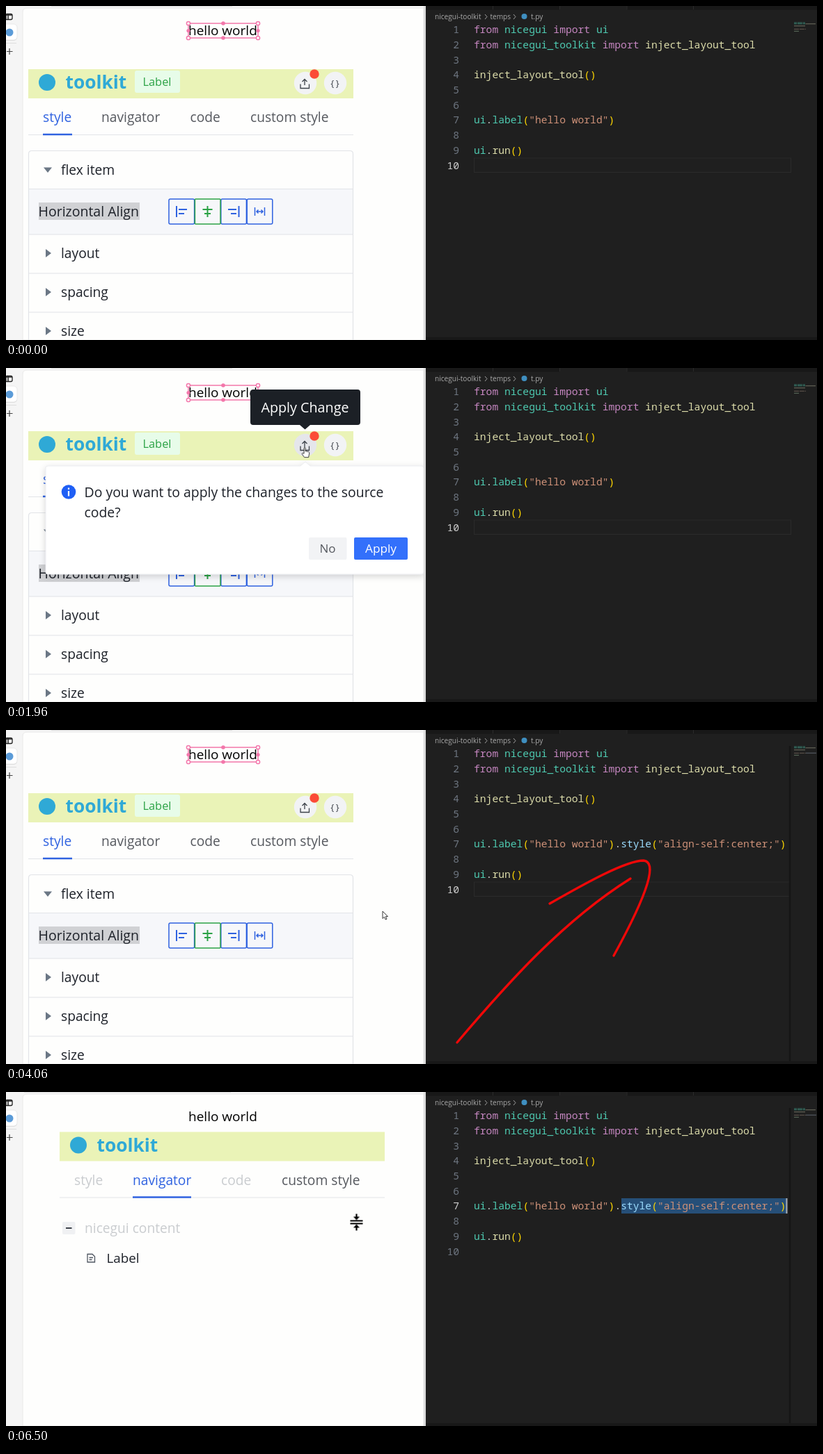
Recreate the animation shown at these times as an HTML page. Size 1165 by 481 pixels, loop 6.8 s.

```html
<!DOCTYPE html>
<html lang="en">
<head>
<meta charset="utf-8">
<title>Layout tool demo</title>
<style>
html, body { margin: 0; width: 100%; height: 100%; overflow: hidden; background: #f5f5f5; }
svg { display: block; width: 100%; height: 100%; }
text { font: 19.2px "Open Sans", "Noto Sans", sans-serif; white-space: pre; }
.code text { font: 14.667px "Noto Sans Mono", "DejaVu Sans Mono", monospace; fill: #d4d4d4; }
.code .num { fill: #6e7681; text-anchor: end; }
.crumb text { font-size: 10.1px; fill: #a9a9a9; }
.brand { font-size: 26.3px; font-weight: 700; fill: #2fa9d6; }
.k { fill: #c586c0; } .t { fill: #4ec9b0; } .f { fill: #dcdcaa; }
.s { fill: #ce9178; } .p { fill: #ffd700; }
.ink { fill: #1d2129; } .grey { fill: #55585e; } .off { fill: #c9cccf; } .blue { fill: #2f62e0; }
.line { fill: none; stroke: currentColor; }

/* one loop is 6.8 s; 1% = 68 ms */
.step { animation: 6.8s step-end infinite; }
.flow { animation: 6.8s linear infinite; }
.panel { animation-name: panel; }
.reload { animation-name: reload; }
.ready { animation-name: ready; }
.tree { animation-name: tree; }
.tip { animation-name: tip; }
.pop { animation-name: pop; transform-origin: 430px 136px; }
.up { animation-name: up; }
.tail { animation-name: tail; }
.fn { animation-name: fn; }
.row { animation-name: row; }
.n7 { animation-name: n7; }
.n10 { animation-name: n10; }
.sel { animation-name: sel; transform-origin: 884px 0; }
.caret { animation-name: caret; }
.caretShow { animation-name: caretShow; }
.slider { animation-name: slider; }
.ink1, .ink2 { stroke-dasharray: 100 200; }
.ink1 { animation-name: draw1; }
.ink2 { animation-name: draw2; }
.show1 { animation-name: show1; }
.show2 { animation-name: show2; }
.mouse { animation-name: mouse; animation-timing-function: ease-in-out; }
.arrow { animation-name: arrow; }
.hand { animation-name: hand; }
.beam { animation-name: beam; }
.size { animation-name: size; }

@keyframes panel { 0% { visibility: visible } 83.3%, 100% { visibility: hidden } }
@keyframes reload { 0% { visibility: hidden } 83.3% { visibility: visible } 89%, 100% { visibility: hidden } }
@keyframes ready { 0% { visibility: hidden } 89%, 100% { visibility: visible } }
@keyframes tree { 0%, 92.6% { opacity: 0 } 94.8%, 100% { opacity: 1 } }
@keyframes tip { 0%, 16.9% { opacity: 0 } 18.4%, 50.7% { opacity: 1 } 52.2%, 100% { opacity: 0 } }
@keyframes pop {
  0%, 25.7% { opacity: 0; transform: scale(.8) }
  28.7%, 45.6% { opacity: 1; transform: none }
  47.5%, 100% { opacity: 0; transform: scale(.8) }
}
@keyframes up { 0% { fill: #f2f3f5 } 16% { fill: #e5e6eb } 29.5%, 100% { fill: #f2f3f5 } }
@keyframes tail { 0% { visibility: hidden } 46.3%, 100% { visibility: visible } }
@keyframes fn { 0% { fill: #dcdcaa } 52.9%, 100% { fill: #9cdcfe } }
@keyframes row {
  0% { transform: none; visibility: visible }
  72.8% { transform: translateY(-65.4px); visibility: visible }
  75.7%, 100% { transform: translateY(-65.4px); visibility: hidden }
}
@keyframes n7 { 0% { fill: #6e7681 } 72.8%, 100% { fill: #ccc } }
@keyframes n10 { 0% { fill: #ccc } 72.8%, 100% { fill: #6e7681 } }
@keyframes sel { 0%, 75.7% { transform: scaleX(0); animation-timing-function: ease-in-out } 81.8%, 100% { transform: none } }
@keyframes caret { 0%, 75.7% { transform: none; animation-timing-function: ease-in-out } 81.8%, 100% { transform: translateX(237.5px) } }
@keyframes caretShow { 0% { visibility: hidden } 72.8%, 100% { visibility: visible } }
@keyframes slider { 0% { visibility: hidden } 82.4% { visibility: visible } 87.2%, 100% { visibility: hidden } }
@keyframes draw1 { 0%, 37.35% { stroke-dashoffset: 100 } 45%, 100% { stroke-dashoffset: 0 } }
@keyframes draw2 { 0%, 46% { stroke-dashoffset: 100 } 50.1%, 100% { stroke-dashoffset: 0 } }
@keyframes show1 { 0% { visibility: hidden } 37.4% { visibility: visible } 77.2%, 100% { visibility: hidden } }
@keyframes show2 { 0% { visibility: hidden } 46.1% { visibility: visible } 77.2%, 100% { visibility: hidden } }
@keyframes mouse {
  0%, 4.4% { transform: translate(338px, 352px) }
  10.3%, 11.2% { transform: translate(345px, 300px) }
  16.2%, 28.7% { transform: translate(429px, 114px) }
  34.6%, 45.6% { transform: translate(527.5px, 254px) }
  47%, 62.2% { transform: translate(541px, 261px) }
  71.3%, 75.7% { transform: translate(884px, 164px) }
  81.8% { transform: translate(1122px, 166px) }
  82.4%, 86.8% { transform: translate(1127px, 168px) }
  94.4%, 100% { transform: translate(503.5px, 187.5px) }
}
@keyframes arrow {
  0% { visibility: hidden } 4.4% { visibility: visible } 15.9% { visibility: hidden }
  46.3% { visibility: visible } 64.5% { visibility: hidden }
  82% { visibility: visible } 87.2% { visibility: hidden }
  93% { visibility: visible } 94.4%, 100% { visibility: hidden }
}
@keyframes hand { 0% { visibility: hidden } 15.9% { visibility: visible } 46.3%, 100% { visibility: hidden } }
@keyframes beam {
  0% { visibility: hidden } 64.5% { visibility: visible } 73% { visibility: hidden }
  75.7% { visibility: visible } 82% { visibility: hidden }
  87.2% { visibility: visible } 93%, 100% { visibility: hidden }
}
@keyframes size { 0% { visibility: hidden } 94.4%, 100% { visibility: visible } }
</style>
</head>
<body>
<svg viewBox="0 0 1165 481" preserveAspectRatio="none">
  <defs>
    <filter id="soft" x="-10%" y="-20%" width="120%" height="150%">
      <feDropShadow dx="0" dy="3" stdDeviation="5" flood-opacity=".16"/>
    </filter>
    <path id="closed" d="M57 -6L65 0L57 6Z" fill="#6b7785"/>
    <g id="head">
      <rect x="32" y="91" width="467" height="42" fill="#eaf3b7"/>
      <circle cx="59" cy="110" r="12" fill="#2fa9d6"/>
      <text class="brand" x="85.5" y="119">toolkit</text>
      <path class="line" color="#e3e5e8" d="M32 185.5H499"/>
    </g>
  </defs>

  <!-- browser frame -->
  <rect width="604" height="481" fill="#f5f5f5"/>
  <path d="M24 481V9Q24 3 30 3H600V481Z" fill="#fefefd" stroke="#e9e9e9"/>
  <path class="step panel" d="M65 0H325" stroke="#ccc"/>
  <path class="step reload" d="M65 0H206" stroke="#ccc"/>
  <path class="step ready" d="M26 0H323" stroke="#ccc"/>
  <path d="M1 11.5H7Q9 11.5 9 13.5V17.5Q9 19.5 7 19.5H1Q0 19.5 0 18.5V12.5Z" class="line" color="#222" stroke-width="1.3"/>
  <path d="M0 13H9M3 12V19" stroke="#222" stroke-width="1.5"/>
  <rect x="-10" y="27" width="26" height="23" rx="5" fill="#ddd"/>
  <rect x="-10" y="26" width="26" height="23" rx="5" fill="#fff" stroke="#dedede" stroke-width=".6"/>
  <g class="step panel"><circle cx="5" cy="38" r="5.5" fill="#5b9bd8"/></g>
  <g class="step ready"><circle cx="5" cy="38" r="5.5" fill="#5b9bd8"/></g>
  <path class="line step reload" color="#555" d="M1 34Q-2 38 1 41"/>
  <path d="M0 53.5H15" stroke="#ddd"/>
  <path d="M1 65.5H9.5M5 61V70" stroke="#444" stroke-width="1.2"/>

  <!-- style panel -->
  <g class="step panel">
    <text x="262" y="42" style="font-size:19px">hello world</text>
    <g fill="#fff" stroke="#f377ab" stroke-width="1.5">
      <rect x="262" y="25" width="100" height="21" fill="none"/>
      <circle cx="262" cy="25" r="2.6"/><circle cx="362" cy="25" r="2.6"/>
      <circle cx="262" cy="46" r="2.6"/><circle cx="362" cy="46" r="2.6"/>
    </g>
    <g fill="#f377ab">
      <circle cx="312" cy="25" r="2.8"/><circle cx="312" cy="46" r="2.8"/>
      <circle cx="262" cy="35.5" r="2.6"/><circle cx="362" cy="35.5" r="2.6"/>
    </g>

    <use href="#head"/>
    <rect x="185" y="93" width="65" height="32" rx="3" fill="#e7fce9"/>
    <text x="196.5" y="115" fill="#2ba245" style="font-size:16.4px">Label</text>
    <circle class="step up" cx="430" cy="111" r="16.2" fill="#f2f3f5"/>
    <path class="line" color="#3d424a" stroke-width="1.3" d="M429 114V106M425.5 109L429 105.5L432.5 109M423 112.5V118.5H435.5V112.5"/>
    <circle cx="443" cy="98" r="6.7" fill="#fb4b36"/>
    <circle cx="473" cy="111" r="16.2" fill="#f2f3f5"/>
    <text x="472.5" y="115.5" fill="#3d424a" text-anchor="middle" style="font:12.5px 'Noto Sans Mono',monospace">{}</text>

    <text class="blue" x="53" y="167">style</text>
    <text class="grey" x="137" y="167">navigator</text>
    <text class="grey" x="264.5" y="167">code</text>
    <text class="grey" x="351" y="167">custom style</text>
    <path d="M53 185H95" stroke="#2f62e0" stroke-width="2.6"/>

    <rect x="33" y="263" width="465" height="66" fill="#f6f7fa"/>
    <path class="line" color="#e2e4e8" stroke-width="1.2" d="M32.5 481V213Q32.5 208.5 37 208.5H494Q498.5 208.5 498.5 213V481M33 263.5H498M33 329H498M33 385H498M33 441H498"/>
    <path d="M54 232.5H66L60 240Z" fill="#6b7785"/>
    <use href="#closed" y="356"/><use href="#closed" y="412"/><use href="#closed" y="468"/>
    <g class="ink">
      <text x="79" y="243">flex item</text>
      <text x="79" y="363">layout</text>
      <text x="79" y="419">spacing</text>
      <text x="79" y="475">size</text>
    </g>
    <rect x="47" y="283" width="145" height="25" fill="#d0d1d4"/>
    <text class="ink" x="46.5" y="303" style="font-size:19.5px">Horizontal Align</text>

    <g class="line" color="#2f62e0" stroke-width="1.5">
      <rect x="234" y="278" width="36.6" height="36" rx="2"/>
      <rect x="308.8" y="278" width="36.6" height="36" rx="2"/>
      <rect x="346.2" y="278" width="36.6" height="36" rx="2"/>
      <rect x="271.4" y="278" width="36.6" height="36" rx="1" stroke="#2ba245"/>
      <path d="M357.5 290V302M371.5 290V302M360 296H369M362.5 293.5L360 296L362.5 298.5M366.5 293.5L369 296L366.5 298.5"/>
      <path stroke-width="2" d="M245 288V304M248 293H260M248 299H256M334.5 288V304M319 293H331M323 299H331"/>
      <path stroke="#2ba245" stroke-width="2" d="M289.5 288V304M282.5 293H296.5M285 299H294"/>
    </g>
  </g>

  <!-- confirm popup and tooltip -->
  <g class="flow pop">
    <path filter="url(#soft)" fill="#fff" stroke="#e5e6eb" stroke-width=".8" d="M60 141H423L430 135L437 141H597Q600 141 600 144V294Q600 297 597 297H60Q57 297 57 294V144Q57 141 60 141Z"/>
    <circle cx="90" cy="178.5" r="10.3" fill="#1f5ff5"/>
    <path d="M90 172.5V175M90 177V184.5" stroke="#fff" stroke-width="2.2"/>
    <g class="ink" >
      <text x="112.5" y="186" style="font-size:19.4px">Do you want to apply the changes to the source</text>
      <text x="112.5" y="215" style="font-size:19.4px">code?</text>
    </g>
    <rect x="435" y="244" width="54.5" height="32" rx="2" fill="#f2f3f5"/>
    <text class="grey" x="450.5" y="266" style="font-size:17px">No</text>
    <rect x="500" y="244" width="77" height="32" rx="2" fill="#3370fb"/>
    <text x="516" y="266" fill="#fff" style="font-size:17.2px">Apply</text>
  </g>
  <g class="flow tip">
    <path fill="#1c2026" d="M355 31H505Q509 31 509 35V78Q509 82 505 82H437L429.5 88.5L422 82H355Q351 82 351 78V35Q351 31 355 31Z"/>
    <text x="366.5" y="64" fill="#fff" style="font-size:19.7px">Apply Change</text>
  </g>

  <!-- reloaded page -->
  <text class="step reload" x="266" y="45" style="font:18.6px Roboto,sans-serif">hello world</text>
  <g class="step ready">
    <text x="262" y="42" style="font-size:19px">hello world</text>
    <use href="#head" x="45" y="-33.5"/>
    <text class="off" x="98" y="134">style</text>
    <text class="blue" x="182" y="134">navigator</text>
    <text class="off" x="309" y="134">code</text>
    <text class="grey" x="396" y="134">custom style</text>
    <path d="M182 151.5H266" stroke="#2f62e0" stroke-width="2.6"/>
    <g class="flow tree">
      <rect x="81" y="187" width="18.5" height="18" rx="2" fill="#f0f1f3"/>
      <path d="M86 196H94.5" stroke="#3d424a" stroke-width="2"/>
      <text class="off" x="113" y="203">nicegui content</text>
      <path class="line" color="#4e5560" stroke-width="1.3" d="M117 233.5H124L127.5 237V245H117ZM119.5 238.5H125M119.5 241.5H123.5"/>
      <text class="ink" x="144.5" y="246" style="font-size:18.8px">Label</text>
    </g>
  </g>

  <!-- editor -->
  <rect x="600" width="4" height="481" fill="#dcdcdc"/>
  <rect x="603" width="562" height="481" fill="#1f1f1f"/>
  <path d="M603 0H795V5.500H603ZM892 0H1165V5.500H892ZM603 477H1165V481H603Z" fill="#181818"/>
  <path class="line" color="#2b2b2b" d="M795.5 0V5M892 0V5.500M699.500 0V5M987.500 0V5"/>
  <g class="crumb">
    <text x="616" y="18.800">nicegui-toolkit</text>
    <text x="695.500" y="18.800">temps</text>
    <text x="754" y="18.800">t.py</text>
    <path class="line" color="#a0a0a0" d="M688 12L691 15.500L688 19M729 12L732 15.500L729 19"/>
    <circle cx="744.500" cy="15" r="4" fill="#3f8fc0"/>
  </g>

  <rect class="step row" x="672.500" y="219" width="455" height="20.500" fill="none" stroke="#2b2b2b"/>
  <g class="step tail"><rect x="1125" y="23" width="40" height="454" fill="#1f1f1f"/><path d="M1126 23V477" stroke="#161616" stroke-width="2.500"/></g>
  <rect class="step slider" x="1127" y="23" width="38" height="39" fill="#333"/>
  <rect class="flow sel" x="884" y="153" width="237.500" height="22" fill="#264f78"/>

  <g class="code">
    <text class="num" x="651" y="39">1</text>
    <text class="num" x="651" y="60.800">2</text>
    <text class="num" x="651" y="82.500">3</text>
    <text class="num" x="651" y="104.300">4</text>
    <text class="num" x="651" y="126">5</text>
    <text class="num" x="651" y="147.800">6</text>
    <text class="num step n7" x="651" y="169.300">7</text>
    <text class="num" x="651" y="191">8</text>
    <text class="num" x="651" y="212.800">9</text>
    <text class="num step n10" x="651" y="234.600">10</text>

    <text x="672" y="39"><tspan class="k">from</tspan> <tspan class="t">nicegui</tspan> <tspan class="k">import</tspan> <tspan class="t">ui</tspan></text>
    <text x="672" y="60.800"><tspan class="k">from</tspan> <tspan class="t">nicegui_toolkit</tspan> <tspan class="k">import</tspan> <tspan class="f">inject_layout_tool</tspan></text>
    <text x="672" y="104.300"><tspan class="f">inject_layout_tool</tspan><tspan class="p">()</tspan></text>
    <text x="672" y="169.300"><tspan class="t">ui</tspan>.<tspan class="t">label</tspan><tspan class="p">(</tspan><tspan class="s">"hello world"</tspan><tspan class="p">)</tspan></text>
    <text class="step tail" x="874.400" y="169.300">.<tspan class="step fn">style</tspan><tspan class="p">(</tspan><tspan class="s">"align-self:center;"</tspan><tspan class="p">)</tspan></text>
    <text x="672" y="212.800"><tspan class="t">ui</tspan>.<tspan class="f">run</tspan><tspan class="p">()</tspan></text>
  </g>

  <g class="step caretShow"><path class="flow caret" d="M884 153V175" stroke="#d8d8d8" stroke-width="1.500"/></g>

  <g class="line" opacity=".55" stroke-width="1.100">
    <path stroke="#4ec9b0" stroke-dasharray="4 .8 7 .8" d="M1132 24H1148M1132 25.800H1148"/>
    <path stroke="#b5b59a" d="M1148.500 25.800H1163M1132 28.800H1148"/>
    <path stroke="#a08a7c" stroke-dasharray="7 .8" d="M1132 33.200H1149"/>
    <path class="step tail" stroke="#8a93a5" d="M1149 33.200H1164"/>
    <path stroke="#8fae8f" d="M1132 36.300H1139"/>
  </g>

  <!-- hand-drawn arrow -->
  <g class="line" color="#f00808" stroke-width="3.400" stroke-linecap="round">
    <g class="step show1"><path class="flow ink1" pathLength="100" d="M648 450C720 365 800 275 897 214"/></g>
    <g class="step show2"><path class="flow ink2" pathLength="100" d="M781 250C830 222 890 188 916 188C935 190 925 230 873 325"/></g>
  </g>

  <!-- pointer -->
  <g class="flow mouse">
    <path class="step arrow" fill="#fff" stroke="#222" stroke-width=".9" d="M0 0V10.500L2.500 8.200L4.200 12L6 11.200L4.400 7.600H7.500Z"/>
    <path class="step hand" fill="#fff" stroke="#222" stroke-width=".9" stroke-linejoin="round" d="M-1 1Q0 -.5 1 1V5.500L5.500 6.500Q7 7 6.600 9L5.500 14.500H-.5L-4 9.500Q-4 7.500 -1 9Z"/>
    <path class="step beam line" color="#ddd" d="M-2.500 -7.500H-.8L0 -6.800L.8 -7.500H2.500M0 -7V7M-2.500 7.500H-.8L0 6.800L.8 7.500H2.500"/>
    <g class="step size">
      <path d="M-9 -2H9M-9 2H9M0 -12V-6M0 6V12" stroke="#000" stroke-width="2.200"/>
      <path d="M-4.500 -8H4.500L0 -3ZM-4.500 8H4.500L0 3Z"/>
    </g>
  </g>
</svg>
</body>
</html>
```
